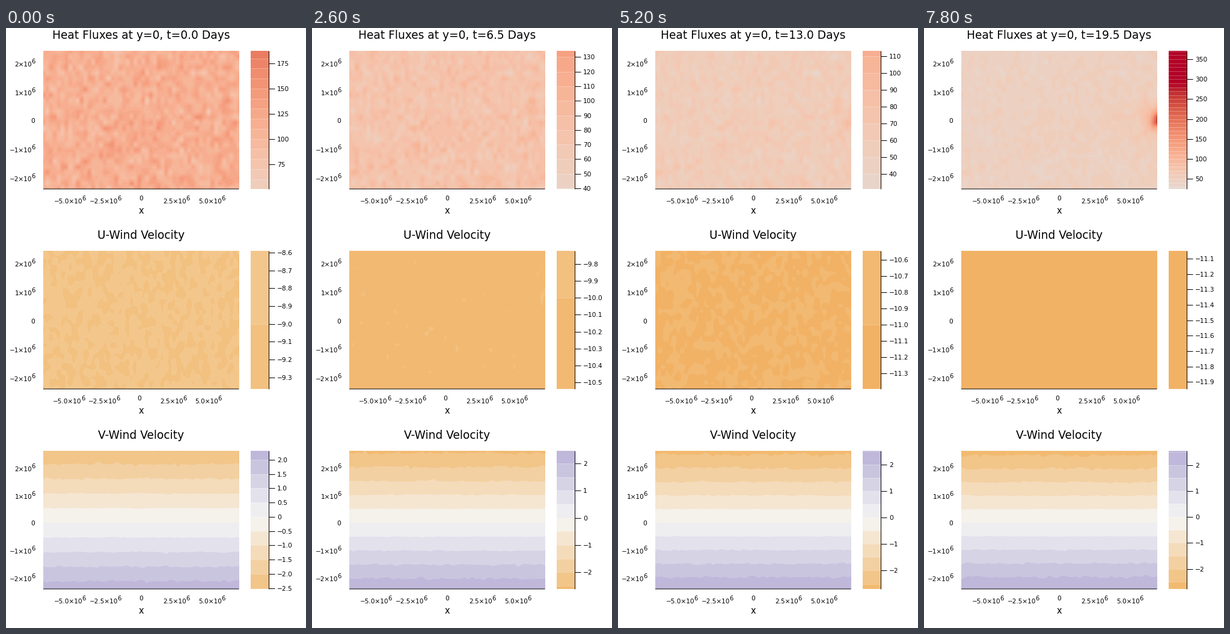
A matplotlib script that plays this animation: 499 by 999 pixels, repeating every 8 s.

```python
import numpy as np
import matplotlib.pyplot as plt
from matplotlib.animation import FuncAnimation
from matplotlib.colors import LinearSegmentedColormap

W, H, DPI = 499, 999, 100
FRAMES, STEP_MS = 40, 200
X0, X1, HEIGHT = 62, 388, 230
BAR0, BAR1 = 407, 437
NX, NY = 52, 26
SS = 2  # supersampling of the filled contours

plt.rcParams["font.family"] = "DejaVu Sans"
fig = plt.figure(figsize=(W / DPI, H / DPI), dpi=DPI, facecolor="white")
ax = fig.add_axes([0, 0, 1, 1])


def gradient(name, *stops):
    return LinearSegmentedColormap.from_list(
        name, [(p, tuple(c / 255 for c in rgb)) for p, rgb in stops], N=1024)


AMBER = gradient("amber", (0, (242, 178, 101)), (1, (243, 199, 140)))
DIVERGE = gradient("diverge", (0, (242, 186, 113)), (0.5, (246, 242, 235)),
                   (0.6, (239, 239, 242)), (1, (191, 184, 218)))


def hat_matrix(n_out, n_in):
    """Linear interpolation weights from n_in nodes to n_out samples."""
    pos = (np.arange(n_out) + 0.5) / n_out * (n_in - 1)
    return np.clip(1 - np.abs(pos[:, None] - np.arange(n_in)), 0, None)


ROWS = hat_matrix(HEIGHT * SS, NY)
COLS = hat_matrix((X1 - X0) * SS, NX).T
GX, GY = np.meshgrid(np.linspace(X0, X1, NX), np.linspace(0, HEIGHT, NY))


def noise(seed):
    return np.clip(np.random.default_rng(seed).standard_normal((NY, NX)), -3.3, 3.3)


HEAT_NOISE = noise(7)


def decay(t, start, end, days):
    return end + (start - end) * np.exp(-t / days)


def storm(t):
    """Strength of the hot spot growing at the right edge."""
    return 162 * np.exp(0.28 * (t - 17))


def heat_field(t, i):
    n = 0.92 * HEAT_NOISE + 0.4 * noise(100 + i)
    dx, dy = GX - X1, GY - 115
    spot = np.exp(-np.hypot(dx, dy / 1.3) / 6.5)
    glow = 0.06 * np.exp(-np.hypot(dx / 90, dy / 35))
    return decay(t, 115, 30, 12) * (1 + 0.16 * n) + storm(t) * (spot + glow)


def heat_range(t):
    calm, peak = decay(t, 187.6, 60, 12), 45 + storm(t)
    return decay(t, 50.3, 0, 27), (calm ** 6 + peak ** 6) ** (1 / 6)


def u_mean(t):
    return -8.98 - 0.2045 * t + 0.0037 * t * t


def u_field(t, i):
    return u_mean(t) + 0.09 * noise(200 + i)


def u_range(t):
    return u_mean(t) - 0.385, u_mean(t) + 0.39 + 0.0062 * t


def v_field(t, i):
    band = decay(t, 24.4, 22.4, 7)
    return (GY - 119.8) / (2 * band) * (1 + 0.018 * noise(300 + i))


def v_range(t):
    return -2.53 - 0.0125 * t, decay(t, 2.315, 2.56, 7)


def tick_step(span):
    """Smallest round step that gives fewer than ten intervals."""
    steps = (m * 10.0 ** e for e in range(-2, 3) for m in (1, 2.5, 5))
    return next(s for s in steps if span / s < 10)


def text(x, y, s, px, ha="center"):
    return ax.text(x, y, s, fontsize=px * 72 / DPI, ha=ha, va="baseline", color="black")


def minus(s):
    return s.replace("-", "−")


def power_label(right, y, mantissa):
    text(right - 4.8, y, minus(f"{mantissa}×10"), 10.5, "right")
    text(right + 0.5, y - 5, "6", 10, "right")


def line(xs, ys, snap=True):
    return ax.plot(xs, ys, color="black", lw=72 / DPI, solid_capstyle="butt", snap=snap)[0]


class Panel:
    def __init__(self, top, title, field, limits, cmap, vmin, vmax, level,
                 x_zero, x_scale, y_zero, y_scale):
        self.top, self.field, self.limits = top, field, limits
        self.cmap, self.vmin, self.vmax, self.level = cmap, vmin, vmax, level
        self.live = []
        bottom = top + HEIGHT
        self.map = self.image(X0, X1)
        self.bar = self.image(BAR0, BAR1)
        line([X0, X1 - 0.5], [bottom, bottom], snap=False)
        line([BAR1 + 0.5] * 2, [top, bottom])
        self.title = text(224.5, top - 20, title, 18.6)
        text(225, bottom + 41, "x", 14.67)
        text(x_zero, bottom + 19, "0", 10.67)
        text(48, y_zero + 4, "0", 10.67, "right")
        for m in (-5.0, -2.5, 2.5, 5.0):
            half_width = 25.5 if m < 0 else 20.5
            power_label(x_zero + m * x_scale + half_width, bottom + 24, m)
        for m in (2, 1, -1, -2):
            power_label(48, y_zero - m * y_scale + 5, m)

    def image(self, left, right):
        blank = np.ones((HEIGHT, right - left, 3))
        return ax.imshow(blank, extent=(left, right, self.top + HEIGHT, self.top),
                         interpolation="nearest", aspect="auto")

    def paint(self, values):
        band = np.floor(values / self.level) * self.level
        return self.cmap((band - self.vmin) / (self.vmax - self.vmin))[..., :3]

    def draw_map(self, t, i):
        rgb = self.paint(ROWS @ self.field(t, i) @ COLS)
        self.map.set_data(rgb.reshape(HEIGHT, SS, X1 - X0, SS, 3).mean(axis=(1, 3)))

    def draw_bar(self, lo, hi):
        values = hi - (np.arange(HEIGHT) + 0.5) * (hi - lo) / HEIGHT
        column = self.paint(values)
        band = np.floor(values / self.level)
        seam = np.diff(band, prepend=band[0]) != 0
        column[seam] += 0.25 * (1 - column[seam])
        self.bar.set_data(np.repeat(column[:, None], BAR1 - BAR0, axis=1))

    def draw_ticks(self, lo, hi):
        for artist in self.live:
            artist.remove()
        self.live = []
        step = tick_step(hi - lo)
        for k in range(int(np.ceil(lo / step)), int(np.floor(hi / step)) + 1):
            y = self.top + (hi - k * step) * HEIGHT / (hi - lo)
            s = f"{k * step:.{int(step < 1)}f}" if k else "0"
            self.live += [line([BAR1, BAR1 + 10], [y, y]),
                          text(451, y + 4, minus(s), 10.67, "left")]

    def update(self, t, i):
        lo, hi = self.limits(t)
        self.draw_map(t, i)
        self.draw_bar(lo, hi)
        self.draw_ticks(lo, hi)


panels = [
    Panel(38, "", heat_field, heat_range, plt.get_cmap("coolwarm"), -285, 285, 10,
          225, 23.7, 154.5, 47.8),
    Panel(371, "U-Wind Velocity", u_field, u_range, AMBER, -12, -9, 1,
          221.5, 23.25, 487.5, 47.8),
    Panel(704, "V-Wind Velocity", v_field, v_range, DIVERGE, -3, 2, 0.5,
          225, 23.7, 824.5, 45.6),
]
ax.set_xlim(0, W)
ax.set_ylim(H, 0)
ax.axis("off")


def update(i):
    t = i * 0.5
    panels[0].title.set_text(f"Heat Fluxes at y=0, t={t:.1f} Days")
    for panel in panels:
        panel.update(t, i)
    return []


anim = FuncAnimation(fig, update, frames=FRAMES, interval=STEP_MS,
                     init_func=lambda: [], repeat=True, repeat_delay=0, blit=False)
plt.show()
```
